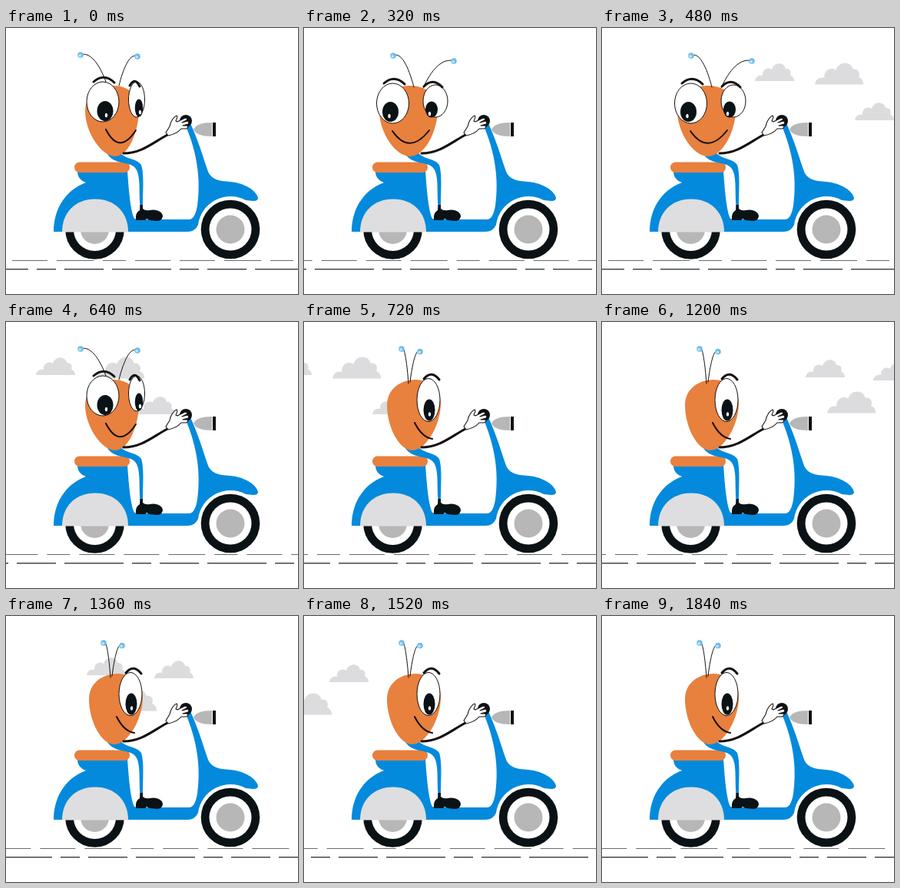
An HTML page for the animation above (1920 ms loop, 380 px wide and 346 px high).

```html
<!DOCTYPE html>
<html lang="en">
<head>
<meta charset="utf-8">
<title>Scooter ride</title>
<style>
  html, body { margin: 0; width: 100%; height: 100%; overflow: hidden; background: #fff; }
  svg { display: block; width: 100%; height: 100%; }
  .line { fill: none; stroke: #15100f; stroke-linecap: round; }
  .blue { fill: #048adc; }
  .orange { fill: #e8803e; }
  .black { fill: #0b1216; }
  .grey { fill: #b7b7b7; }
  .white { fill: #fff; }
  .eye, .hand { fill: #fff; stroke: #15100f; stroke-linejoin: round; }
</style>
</head>
<body>
<svg viewBox="0 0 380 346">
  <defs>
    <path id="cloud" fill="#dcdbde" d="M0 23C1 17 5 15 10 16C9 8 17 4 22 8C25-2 38-2 40 7C46 6 48 12 46 15Q51 18 51 23Z"/>
    <g id="wheel">
      <circle class="black" r="38.3"/>
      <circle class="white" r="27.5"/>
      <circle class="grey" r="18.5"/>
    </g>
  </defs>

  <g id="clouds"></g>
  <g id="road"></g>

  <use href="#wheel" x="115.500" y="262.500"/>
  <path class="blue" d="M93 186H158C160 215 162 235 166 246Q167 249 172 249H238Q246 249 249 231C254 195 248 162 235 130L240 124C250 146 256 166 262 184C266 197 276 199 292 200C312 202 326 212 328 221Q328 225 322 225L312 224A42.500 42.500 0 0 0 250 256Q246 265 236 265H62C62 238 75 212 104 201C96 198 93 193 93 186Z"/>
  <path fill="#dedee0" d="M73 265.500C73 240 90 222.500 116 222.500S159 240 159 265.500Z"/>
  <use href="#wheel" x="292" y="262"/>
  <rect class="orange" x="89" y="174.500" width="72" height="13.500" rx="6.500"/>

  <path class="grey" d="M244 132Q248 123 268 123V141Q248 141 244 132Z"/>
  <rect class="black" x="269" y="123" width="4" height="18"/>

  <path class="blue" d="M132 164C140 177 158 174 166 180C177 188 172 214 175 235H178C178 214 180 190 176 178C169 169 157 171 149 163Z"/>
  <path class="black" d="M174.500 230H178V235Q181 238 187 237C196 235 204 239 204 245Q203 251 196 251L187 250L183 248L181 250H169Q168 240 174 237Z"/>

  <g id="heads"></g>

  <circle class="black" cx="234" cy="121" r="8"/>
  <path class="line" stroke-width="3" d="M153 163C176 163 190 150 210 139"/>
  <path class="hand" stroke-width="1.100" d="M208 136L213 128C214 121 219 115 222 114Q224 115 221 121L223 122L233 117Q237 117 235 120L229 123L236 121Q239 122 237 125L230 127L236 127Q238 130 234 131L228 131Q222 138 211 140Z"/>
</svg>

<script>
const FRAME = 80, LOOP = 1920;
const NS = "http://www.w3.org/2000/svg";

function add(parent, tag, attrs = {}) {
  const node = document.createElementNS(NS, tag);
  for (const key in attrs) node.setAttribute(key, attrs[key]);
  parent.append(node);
  return node;
}
const byId = id => document.getElementById(id);
const show = (node, visible) => { node.style.display = visible ? "" : "none"; };

// Starts a head and returns it with tools that add its features.
function newHead() {
  const g = add(byId("heads"), "g");
  const oval = (className, cx, cy, rx, ry) => add(g, "ellipse", { class: className, cx, cy, rx, ry });
  const line = (d, width) => add(g, "path", { class: "line", d, "stroke-width": width });
  return {
    g,
    skull(left, right, chin) {
      const mid = (left + right) / 2 + 2, w = (right - left) / 4;
      add(g, "path", { class: "orange", d:
        `M${left} 108C${left} 86 ${mid - w} 75 ${mid} 75S${right} 86 ${right} 106` +
        `C${right} 134 ${chin + w} 167 ${chin} 167S${left} 136 ${left} 108Z` });
    },
    eye(x, y, rx, ry, lookX, lookY) {
      const px = x + lookX, py = y + lookY;
      oval("eye", x, y, rx, ry);
      oval("black", px, py, rx / 2, ry / 2);
      oval("white", px + lookX / 2, py + 5.5, 1.7, 2.7);
    },
    brow: (x, y, width) => line(`M${x} ${y}q${width / 2} -12 ${width} 1`, 3),
    smile: (x, y, dx, dy, sag) => line(`M${x} ${y}q${dx / 2 - 2} ${sag} ${dx} ${dy}`, 2),
    antenna(x, y, dx, dy) {
      line(`M${x} ${y}c${dx * 0.25} ${dy * 0.65} ${dx * 0.63} ${dy * 1.15} ${dx} ${dy}`, 1);
      add(g, "circle", { cx: x + dx, cy: y + dy, r: 3.8, fill: "#6fbde9" });
      add(g, "circle", { cx: x + dx - 0.8, cy: y + dy + 0.8, r: 1.8, fill: "#c4e7f8" });
    }
  };
}

function turnedHead() {
  const head = newHead();
  head.skull(103, 173, 142);
  head.eye(126, 96, 21, 26, 3, 12);
  head.eye(170, 93, 10.5, 23, 3, 11);
  head.brow(114, 70, 27);
  head.brow(161, 75, 13);
  head.smile(130, 132, 39, 1, 34);
  head.antenna(130, 70, -33, -35);
  head.antenna(147, 75, 24, -38);
  return head.g;
}

function frontHead() {
  const head = newHead();
  head.skull(98, 174, 138);
  head.eye(115.5, 98, 21, 26, -3, 11);
  head.eye(171, 95, 16, 21, -5, 11);
  head.brow(104, 72, 27);
  head.brow(156, 76, 24);
  head.smile(115, 134, 48, -1, 32);
  head.antenna(143, 77, -27, -41);
  head.antenna(155, 78, 40, -35);
  return head.g;
}

function sideHead() {
  const head = newHead();
  head.skull(108, 178, 141);
  head.eye(162, 101.5, 15, 28, 1, 13);
  head.brow(156, 74, 20);
  head.smile(144, 131, 23, 21, 19);
  head.antenna(136, 80, -9, -45);
  head.antenna(138, 78, 13, -39.5);
  return head.g;
}

const heads = { turned: turnedHead(), front: frontHead(), side: sideHead() };

function poseAt(frame) {
  if (frame >= 9) return "side";
  return frame >= 2 && frame < 7 ? "front" : "turned";
}

// Clouds cross the stage in two groups; each is laid out as seen at frame "at".
const CLOUD_SPEED = 80;
function cloudGroup(at, drift, clouds) {
  const g = add(byId("clouds"), "g");
  for (const [x, y, scale] of clouds)
    add(g, "use", { href: "#cloud", transform: `translate(${x} ${y}) scale(${scale})` });
  return frame => {
    const n = frame - at;
    show(g, Math.abs(n) < 7 && frame > 4);
    g.setAttribute("transform", `translate(${-CLOUD_SPEED * n} ${drift * n})`);
  };
}
const cloudGroups = [
  cloudGroup(8, 0, [[39, 46, 1], [117, 45, 1.24], [169, 97, 1]]),
  cloudGroup(15, 2.5, [[265, 49, 1], [293, 90, 1.24], [353, 53, 1]])
];

// A dashed line that moves left by one whole pattern every six frames.
function roadLine(y, width, color, start, gap, dashes) {
  const period = dashes.reduce((sum, dash) => sum + dash + gap, 0);
  const node = add(byId("road"), "path", {
    d: `M${-period} ${y}H${380 + period}`, stroke: color, "stroke-width": width,
    "stroke-dasharray": dashes.map(dash => `${dash} ${gap}`).join(" ")
  });
  return frame => {
    const x = start - period * (frame % 6) / 6;
    node.setAttribute("transform", `translate(${x < 0 ? x + period : x} 0)`);
  };
}
const roadLines = [
  roadLine(302.5, 1, "#656b6d", 126, 12, [30, 46, 46, 48]),
  roadLine(313.8, 1.4, "#44484a", 40, 11, [25, 51, 77])
];

function draw(time) {
  const frame = Math.floor((time % LOOP) / FRAME);
  for (const name in heads) show(heads[name], name === poseAt(frame));
  for (const move of [...cloudGroups, ...roadLines]) move(frame);
}

const start = performance.now();
function tick() {
  draw(performance.now() - start);
  requestAnimationFrame(tick);
}
tick();
</script>
</body>
</html>
```
